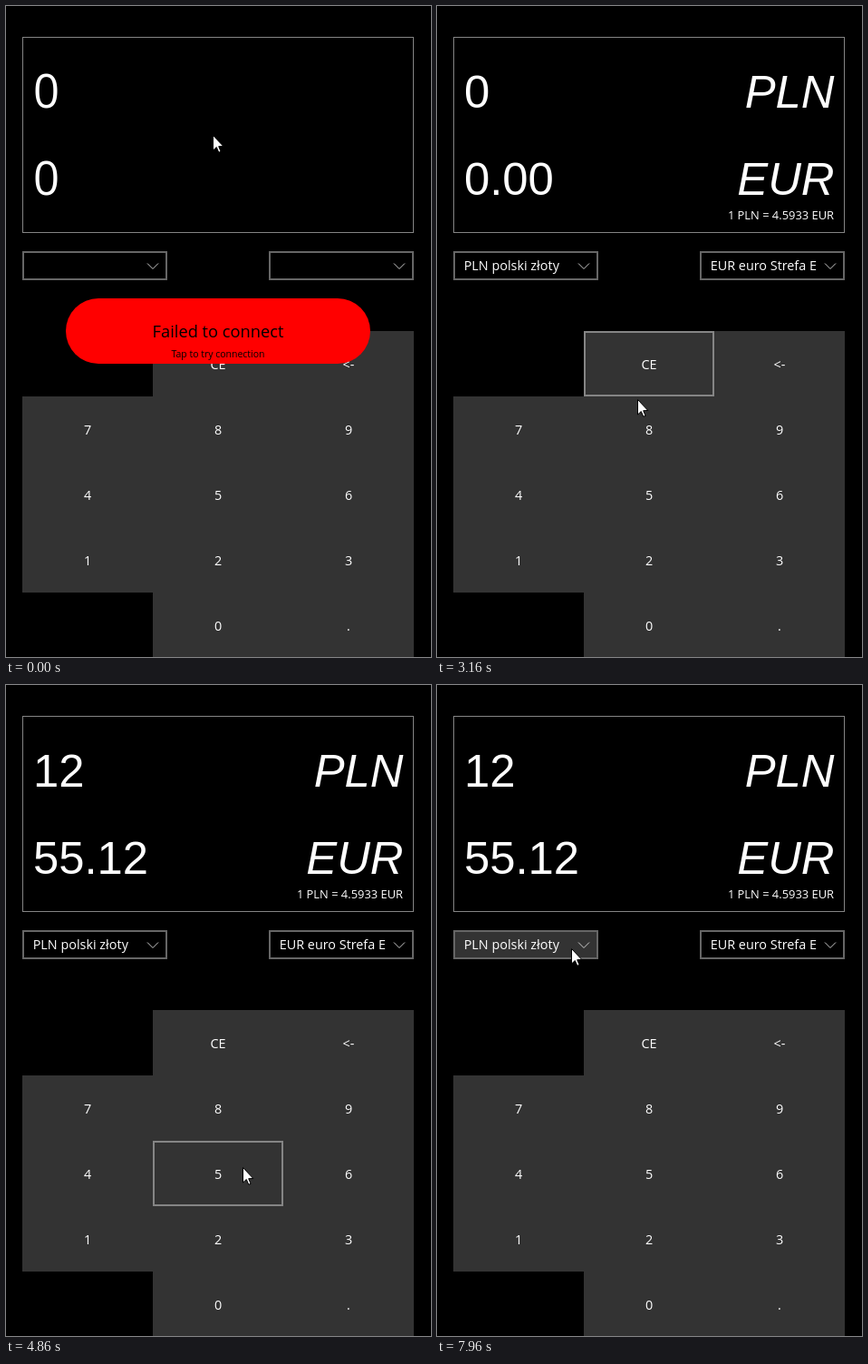
An HTML page with a canvas for the animation above (8 s loop, 469 by 717 pixels).

```html
<!DOCTYPE html>
<html lang="en">
<head>
<meta charset="utf-8">
<title>Currency converter</title>
<style>
html, body { margin: 0; width: 100%; height: 100%; overflow: hidden; background: #000; }
canvas { display: block; }
</style>
</head>
<body>
<canvas id="stage" width="469" height="717"></canvas>
<script>
const ctx = document.getElementById('stage').getContext('2d');
const LOOP = 8000, STEP = 77.6, ONLINE = 2000, PRESS = 100, RATE = 4.5933;
const UI = '"Open Sans", "Noto Sans", sans-serif';
const BIG = '"Liberation Sans", Arial, sans-serif';
const LABEL = '14.4px ' + UI;

// Pointer moves: from, to, x, y
const home = [229, 143];
const moves = [
  [600, 1300, 245, 354],
  [2930, 3160, 222, 434],
  [3160, 3700, 95, 605],
  [3850, 4230, 224, 603],
  [4310, 4540, 234, 573],
  [4630, 4860, 262, 532],
  [5870, 6480, 376, 411],
  [6970, 7120, 362, 446],
  [7195, 7960, 149, 291]
];
const clicks = [[3850, '1'], [4230, '2'], [5030, '5'], [6480, '<-']];

const keys = ['', 'CE', '<-', '7', '8', '9', '4', '5', '6', '1', '2', '3', '', '0', '.']
  .map((label, i) => ({ label, x: 18 + i % 3 * 144, y: 358 + Math.floor(i / 3) * 72, w: 144, h: 72 }))
  .filter(k => k.label);
const combos = ['PLN polski złoty', 'EUR euro Strefa E']
  .map((label, i) => ({ label, x: 18 + i * 272, y: 270, w: 160, h: 32 }));

const ease = k => k * k * (3 - 2 * k);
const inside = (b, [x, y]) => x >= b.x && x < b.x + b.w && y >= b.y && y < b.y + b.h;

function pointerAt(t) {
  return moves.reduce(([px, py], [from, to, x, y]) => {
    const k = ease(Math.min(1, Math.max(0, (t - from) / (to - from))));
    return [px + (x - px) * k, py + (y - py) * k];
  }, home);
}

function amountAt(t) {
  return clicks.filter(([at]) => at <= t)
    .reduce((s, [, key]) => key === '<-' ? s.slice(0, -1) : s + key, '') || '0';
}

function text(str, x, y, font, color = '#fff', align = 'left') {
  ctx.font = font;
  ctx.fillStyle = color;
  ctx.textAlign = align;
  ctx.fillText(str, x, y);
}

function frame(b, color, width) {
  ctx.strokeStyle = color;
  ctx.lineWidth = width;
  ctx.strokeRect(b.x + width / 2, b.y + width / 2, b.w - width, b.h - width);
}

function drawDisplay(amount, online) {
  frame({ x: 18, y: 34, w: 432, h: 216 }, '#848484', 1);
  const font = '50.8px ' + (online ? BIG : UI);
  const rows = [[amount, 'PLN', 112], [online ? (amount * RATE).toFixed(2) : '0', 'EUR', 207.5]];
  for (const [value, code, y] of rows) {
    text(value, 30, y, font);
    if (online) text(code, 438.5, y, 'italic ' + font, '#fff', 'right');
  }
  if (online) text(`1 PLN = ${RATE} EUR`, 438, 235, '12.9px ' + UI, '#fff', 'right');
}

function drawCombo(b, online, hover) {
  if (hover) {
    ctx.fillStyle = '#333';
    ctx.fillRect(b.x, b.y, b.w, b.h);
  }
  frame(b, '#666', 2);
  if (online) text(b.label, b.x + 11.7, 291, LABEL);
  const x = b.x + 144;
  ctx.strokeStyle = '#ccc';
  ctx.lineWidth = 1;
  ctx.beginPath();
  ctx.moveTo(x - 6, 283.5);
  ctx.lineTo(x, 289.5);
  ctx.lineTo(x + 6, 283.5);
  ctx.stroke();
}

function drawKey(k, hover, pressed) {
  ctx.fillStyle = hover && pressed ? '#666' : '#333';
  ctx.fillRect(k.x, k.y, k.w, k.h);
  if (hover && !pressed) frame(k, '#858585', 2);
  text(k.label, k.x + 72, k.y + 42, LABEL, '#fff', 'center');
}

function drawNotice() {
  ctx.fillStyle = '#f00';
  ctx.beginPath();
  ctx.roundRect(66, 322, 336, 72, 36);
  ctx.fill();
  text('Failed to connect', 234, 365, '18.3px ' + UI, '#000', 'center');
  text('Tap to try connection', 234, 387, '10.5px ' + UI, '#000', 'center');
}

function drawPointer([x, y]) {
  ctx.save();
  ctx.translate(Math.round(x) - 0.5, Math.round(y) - 0.5);
  ctx.fillStyle = '#fff';
  ctx.strokeStyle = '#000';
  ctx.lineWidth = 1;
  const arrow = new Path2D('M0 0V16.5L3.8 13L6.3 18.8L8.6 17.8L6.2 12.2L11.3 12Z');
  ctx.fill(arrow);
  ctx.stroke(arrow);
  ctx.restore();
}

function draw(t) {
  const online = t >= ONLINE;
  const q = 600 + Math.floor((t - 580) / STEP) * STEP;
  const over = pointerAt(q - STEP / 2);
  const pressed = clicks.some(([at]) => t >= at - PRESS && t < at);

  ctx.fillStyle = '#000';
  ctx.fillRect(0, 0, 469, 717);
  drawDisplay(amountAt(t), online);
  combos.forEach(b => drawCombo(b, online, inside(b, over)));
  keys.forEach(k => drawKey(k, online && inside(k, over), pressed));
  if (!online) drawNotice();
  drawPointer(pointerAt(q));
}

const start = performance.now();
function tick() {
  draw((performance.now() - start) % LOOP);
  requestAnimationFrame(tick);
}
tick();
</script>
</body>
</html>
```
